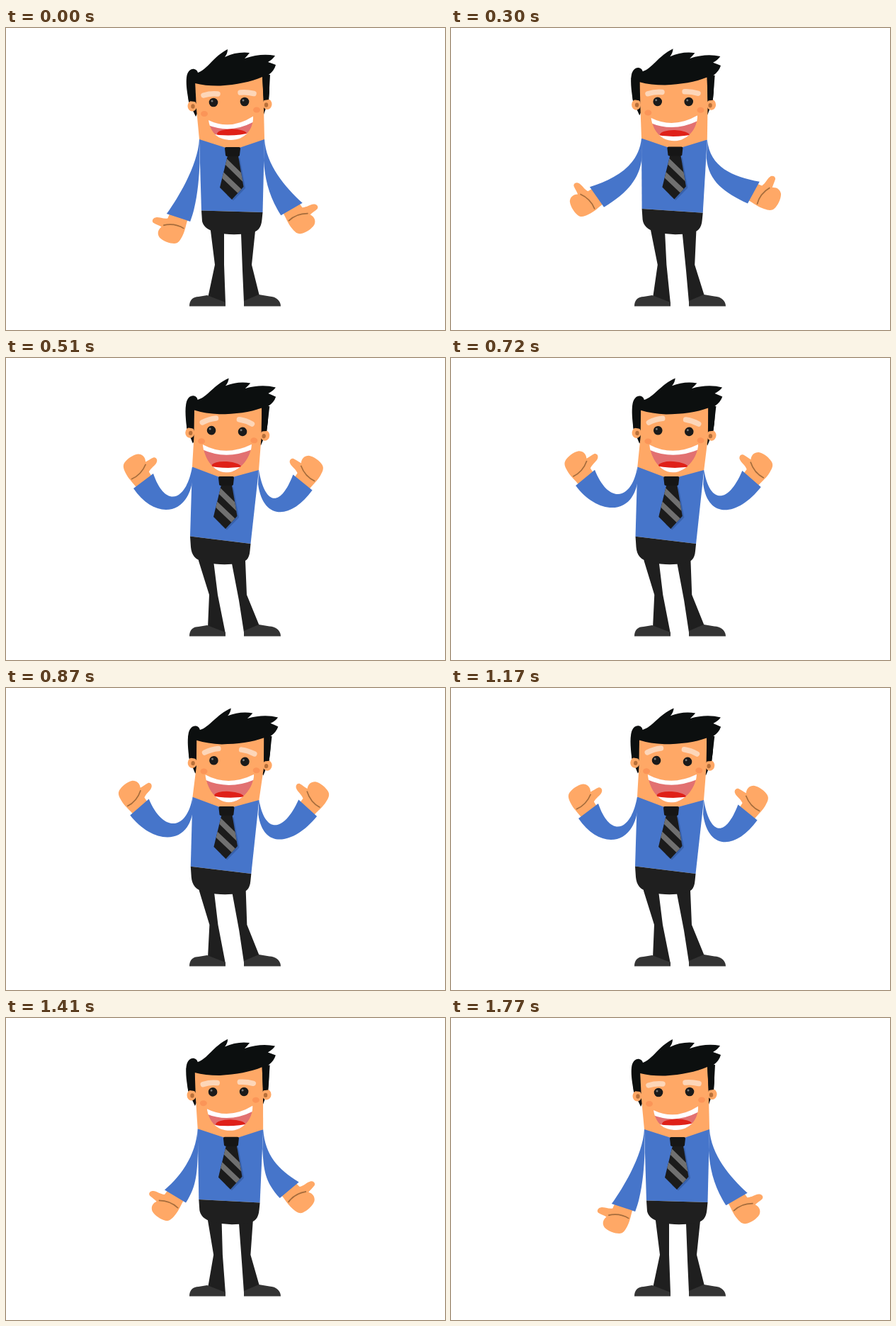
Recreate the animation shown at these times as an HTML page. Size 620 px wide and 426 px high, loop 1800 ms.

```html
<!DOCTYPE html>
<html lang="en">
<head>
<meta charset="utf-8">
<title>Cheerful man</title>
<style>
html, body { margin: 0; width: 100%; height: 100%; overflow: hidden; background: #fff; }
svg { display: block; width: 620px; height: 426px; }
.skin { fill: #ffa866; }
.shirt { fill: #4675ca; }
.pants { fill: #1f1f1f; }
.hair { fill: #0c0f0f; }
</style>
</head>
<body>
<svg viewBox="0 0 620 426">
  <defs>
    <clipPath id="blade"><path d="M313 180H328L335.500 224 319 242 302 225Z"/></clipPath>
    <clipPath id="lips"><path id="lipShape"/></clipPath>
    <g id="hand">
      <path class="skin" d="M-14-4L-15 6C-21 9-28 8-32 10C-37 12-37 18-33 19C-29 20-24 20-20 21
        C-24 27-23 33-18 37C-11 41 0 41 6 39C12 37 13 31 14 26C16 16 14 8 14-4Z"/>
      <path d="M-18 18Q-3 9 13 13" fill="none" stroke="#a56c3c" stroke-width="1.800"/>
    </g>
  </defs>

  <path id="legL" class="pants"/>
  <path id="legR" class="pants"/>
  <g fill="#343434">
    <path d="M259 392.500C259 384 264 379 272 379L284 377 310 387V392.500Z"/>
    <path d="M336 392.500V385L357 376 372 378.500C382 379 388 385 388 392.500Z"/>
  </g>

  <g><use id="handL" href="#hand"/><path id="armL" class="shirt"/></g>
  <g transform="scale(-1 1)"><use id="handR" href="#hand"/><path id="armR" class="shirt"/></g>
  <path id="shirt" class="shirt"/>
  <path id="hips" class="pants"/>

  <g id="headBack">
    <path class="hair" d="M255 72L258 104 268 125 280 100H350L364 122 371 102 373 66Z"/>
    <g class="skin">
      <ellipse cx="263" cy="110" rx="6.500" ry="7.500"/>
      <ellipse cx="369" cy="107.500" rx="6.500" ry="7.500"/>
    </g>
    <g fill="#b8703a">
      <ellipse cx="264" cy="110.500" rx="2.700" ry="3.200"/>
      <ellipse cx="367.500" cy="108.500" rx="2.700" ry="3.200"/>
    </g>
  </g>
  <path id="face" class="skin"/>

  <g id="tie">
    <path fill="#3862ad" d="M330 182L338 226 321 243.500 312 236Z"/>
    <path fill="#1b1b1b" d="M313 180H328L335.500 224 319 242 302 225Z"/>
    <path clip-path="url(#blade)" stroke="#707070" stroke-width="7.500" d="M302 180L342 219M296 198L336 236"/>
    <path fill="#161616" d="M311 168H329Q331 168 331 170L330 179Q330 181 327 181H313Q310 181 310 179L309 170Q309 168 311 168Z"/>
  </g>

  <g id="headFront">
    <path class="hair" d="M267 104L258 103C256 92 254 80 255 70C256 61 261 57 266 58Q270 59 271 63
      C284 59 293 40 313 30Q313 36 309 41Q326 33 344 35Q341 39 337 43Q360 35 380 39Q377 44 370 48
      Q376 50 381 52Q379 60 371 66Q373 84 371 101L364 102 362 69C346 76 325 80 303 81.500Q283 82 267 78Z"/>
    <g fill="#fb9558">
      <ellipse cx="280" cy="121" rx="5" ry="4"/>
      <ellipse cx="354" cy="115.500" rx="5" ry="4"/>
    </g>
    <g fill="none" stroke="#fdd6b8" stroke-width="7.500" stroke-linecap="round">
      <path id="browL" d="M279 95Q289 92 299 93"/>
      <path id="browR" d="M331 91Q340 90 350 92.500"/>
    </g>
    <g fill="#1a1a1a">
      <circle cx="293" cy="105" r="6.300"/>
      <circle cx="337" cy="104" r="6.300"/>
    </g>
    <g fill="#777">
      <circle cx="291" cy="103" r="1.500"/>
      <circle cx="335" cy="102" r="1.500"/>
    </g>
  </g>

  <g id="mouthParts" clip-path="url(#lips)">
    <path id="mouth" fill="#e27171"/>
    <ellipse id="tongue" fill="#df2018" rx="21" ry="7"/>
    <path id="lowTeeth" fill="#fff"/>
    <path id="teeth" fill="none" stroke="#fff" stroke-width="13"/>
  </g>
</svg>
<script>
const LOOP = 1800, STEP = 30, RAD = Math.PI / 180;
const el = id => document.getElementById(id);
const set = (id, name, value) => el(id).setAttribute(name, value);
const path = (id, d) => set(id, 'd', d);
const polar = (length, degrees) => [length * Math.cos(degrees * RAD), length * Math.sin(degrees * RAD)];
const add = (p, q) => [p[0] + q[0], p[1] + q[1]];

// Only the left cuff is keyed; the body and the right arm follow from it and the lean
const rest = { lean: 0, shift: 0, x: 243.5, y: 267.5, turn: 18 };
const spread = { lean: .4, shift: -1.3, x: 206, y: 238.5, turn: 55 };
const raised = { lean: 1, shift: -3, x: 194, y: 173.5, turn: 143 };
const wide = { lean: .95, shift: .4, x: 188.5, y: 168, turn: 139 };
const lowered = { lean: .23, shift: -.9, x: 239, y: 251.5, turn: 31 };
const times = [180, 300, 510, 855, 1170, 1410, 1770];
const poses = [rest, spread, raised, wide, raised, lowered, rest];

// Smooth interpolation that never overshoots a key
function curve(name, t) {
  const last = times.length - 1, at = k => poses[k][name];
  if (t <= times[0] || t >= times[last]) return rest[name];
  const rate = k => (at(k + 1) - at(k)) / (times[k + 1] - times[k]);
  const slope = k => {
    if (k === 0 || k === last) return 0;
    const a = rate(k - 1), b = rate(k);
    return a * b > 0 ? 2 * a * b / (a + b) : 0;
  };
  const i = times.findIndex(k => k > t) - 1;
  const h = times[i + 1] - times[i], u = (t - times[i]) / h, v = 1 - u;
  return at(i) * v * v * (1 + 2 * u) + at(i + 1) * u * u * (3 - 2 * u)
    + h * u * v * (slope(i) * v - slope(i + 1) * u);
}

// Both edges leave the shoulder downwards and meet the cuff along the forearm
function drawArm(side, x, y, turn, shoulder, armpit) {
  const half = polar(17.5, turn);
  const top = [x - half[0], y - half[1]], low = add([x, y], half);
  path('arm' + side, `M${shoulder}
    C${add(shoulder, [-1 - .05 * turn, 33 + .1 * turn])} ${add(top, polar(28 + .18 * turn, turn - 72))} ${top}
    L${low}
    C${add(low, polar(24 + .2 * turn, turn - 87))} ${add(armpit, [-.05 * turn, 20 + .22 * turn])} ${armpit}Z`);
  set('hand' + side, 'transform', `translate(${x} ${y}) rotate(${turn}) scale(.94)`);
}

function drawLegs(s) {
  path('legL', `M${289 - 17 * s} 280V286L${295 - 8 * s} 334L285 381L310 389
    L${308 - 9 * s} 334L${308 - 15 * s} 286V280Z`);
  path('legR', `M${332 - 13 * s} 280V290L${334 - 5 * s} 342L336 387L358 378
    L${347 - 7 * s} 334L${352 - 14 * s} 286V280Z`);
}

function drawMouth(s) {
  const lx = 286 - 4 * s, ly = 130 - 4.5 * s;
  const rx = 349 + 2 * s, ry = 124.5 - 3.5 * s;
  const bx = 318 - 1.5 * s, by = 158 + 5 * s, sag = 145 - 4 * s;
  const shape = `M${lx} ${ly}Q${bx - 1} ${sag} ${rx} ${ry}C${rx + 1} ${ry + 19} ${bx + 19} ${by} ${bx} ${by}
    C${bx - 18} ${by} ${lx + 3} ${ly + 19} ${lx} ${ly}Z`;
  path('lipShape', shape);
  path('mouth', shape);
  path('teeth', `M${lx - 3} ${ly - 1}Q${bx - 1} ${sag} ${rx + 3} ${ry - 1}`);
  path('lowTeeth', `M${bx - 30} ${by - 9}Q${bx} ${by - 3} ${bx + 30} ${by - 11}V${by + 3}H${bx - 30}Z`);
  set('tongue', 'cx', bx + 1);
  set('tongue', 'cy', by - 8.5);
}

function drawTorso(s, tl, tr) {
  const bl = [276 - 16 * s, 257.5 - 6 * s], br = [362.5 - 17 * s, 260 + 2 * s];
  path('shirt', `M${tl}L${tr}L${br}L${bl}Z`);
  path('hips', `M${bl}L${br}L${add(br, [-1, 10])}
    C${add(br, [-2, 22])} ${br[0] - 7},288 ${br[0] - 18},289
    Q${319 - 10 * s},294 ${bl[0] + 21},288
    C${bl[0] + 7},285 ${bl[0] + 2},278 ${add(bl, [1, 15])}Z`);
  set('tie', 'transform', `translate(${-9 * s} ${-s})`);
}

function drawHead(s, shift, tl, tr) {
  const tilt = 3.5 * s, rise = -1.5 * s;
  const move = `translate(${shift} ${rise}) rotate(${tilt} 315 105)`;
  for (const id of ['headBack', 'headFront', 'mouthParts']) set(id, 'transform', move);
  const [c, n] = polar(1, tilt);
  const onHead = (x, y) => [
    315 + shift + (x - 315) * c - (y - 105) * n,
    105 + rise + (x - 315) * n + (y - 105) * c
  ];
  const knot = [320 - 9 * s, 168.5 - s];
  path('face', `M${onHead(267, 74)}L${onHead(362, 66)}L${onHead(364, 112)}L${tr}
    L${add(knot, [11, 0])}L${add(knot, [-11, 0])}L${tl}L${onHead(269, 115)}Z`);
  const frown = s * s;
  set('browL', 'transform', `translate(0 ${-3 * s}) rotate(${-15 * frown} 289 94)`);
  set('browR', 'transform', `translate(0 ${-2 * s}) rotate(${11 * frown} 340 92)`);
  drawMouth(s);
}

function draw(t) {
  const [s, shift, x, y, turn] = Object.keys(rest).map(name => curve(name, t));
  const tl = [273 - 10 * s, 157 - 3.5 * s], tr = [365 - 8 * s, 157 + s];
  const drop = 14 * s - 12;
  drawArm('L', x, y, turn, tl, [tl[0] + .5, 190 - 18 * s]);
  // the right side is drawn mirrored, so its x values are negative
  drawArm('R', x - 647 + 34 * s, y + drop, turn - drop, [-tr[0], tr[1]], [1 - tr[0], 187 - 9 * s]);
  drawLegs(s);
  drawTorso(s, tl, tr);
  drawHead(s, shift, tl, tr);
}

const start = performance.now();
function tick() {
  const t = (performance.now() - start) % LOOP;
  draw(Math.floor(t / STEP) * STEP);
  requestAnimationFrame(tick);
}
tick();
</script>
</body>
</html>
```
